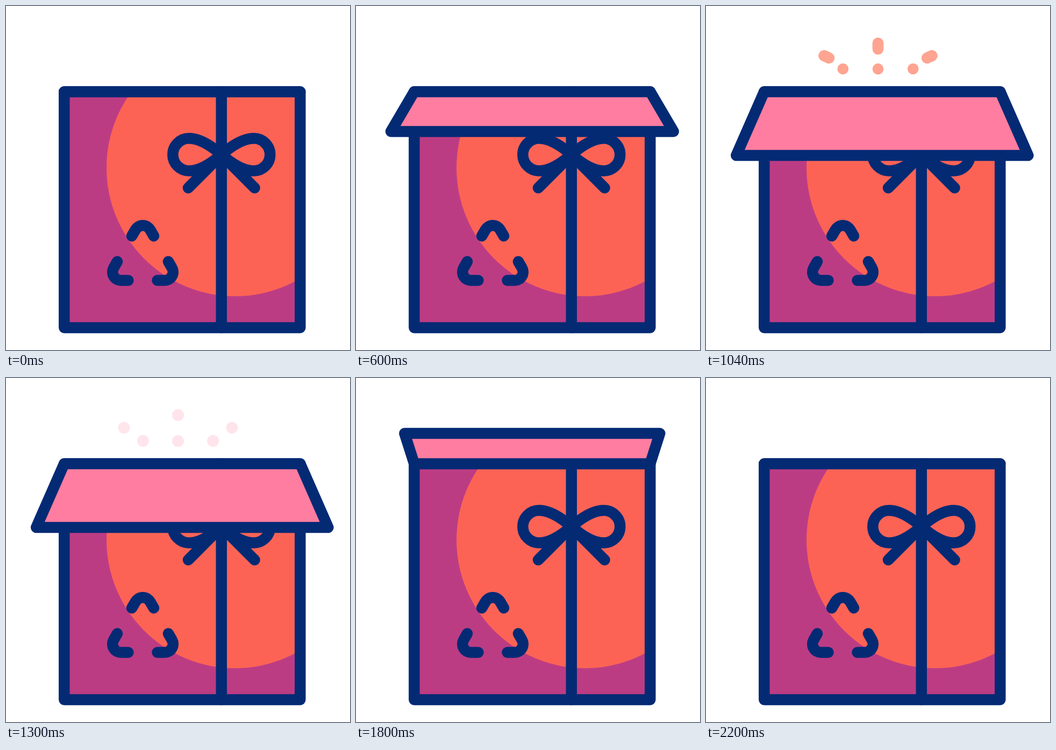
Write an HTML page that moves like this. It is 640 by 640 pixels and loops after 2.4 s.

```html
<!DOCTYPE html>
<html lang="en">
<head>
<meta charset="utf-8">
<title>Gift box</title>
<style>
  html, body { margin: 0; width: 100%; height: 100%; overflow: hidden; background: #fff; }
  svg { display: block; width: 100%; height: 100%; }
  .line { fill: none; stroke: #042a74; stroke-width: 20.5; stroke-linecap: round; stroke-linejoin: round; }
</style>
</head>
<body>
<svg viewBox="0 0 640 640">
  <defs>
    <clipPath id="front"><rect x="108.3" y="159.4" width="439" height="439"/></clipPath>
    <g id="loop">
      <path d="M400.8 276.5C384 262 362 246.3 340.5 246.3A30.2 30.2 0 0 0 340.5 306.7C362 306.7 384 291 400.8 276.5L339 338.5"/>
    </g>
    <g id="corner">
      <path d="M207 475.5L200.3 487.1A15.6 15.6 0 0 0 213.8 510.5H227.5"/>
    </g>
  </defs>

  <g id="sparks" fill="none" stroke-linecap="round">
    <path pathLength="1" d="M254.8 117Q241 101 219.5 92.5"/>
    <path pathLength="1" d="M320 117.2V69"/>
    <path pathLength="1" d="M385.2 117Q399 101 420.5 92.5"/>
  </g>

  <g clip-path="url(#front)">
    <rect x="108" y="159" width="440" height="440" fill="#bc3c84"/>
    <circle cx="426" cy="301" r="239" fill="#fc6355"/>
  </g>
  <g class="line">
    <rect x="108.3" y="159.4" width="439" height="439"/>
    <path d="M400.8 159.4V598.4"/>
    <use href="#loop"/>
    <use href="#loop" transform="matrix(-1 0 0 1 801.6 0)"/>
    <path d="M234 428L241 416A15.6 15.6 0 0 1 268 416L275 428"/>
    <use href="#corner"/>
    <use href="#corner" transform="matrix(-1 0 0 1 509 0)"/>
  </g>
  <path id="flap" class="line" style="fill:#ff7da0"/>
</svg>

<script>
const LOOP = 2400;
const LEFT = 108.3, RIGHT = 547.3, HINGE = 159.4;

// Free edge of the flap: height, and how far it sticks out on each side
const CLOSED = { y: HINGE, out: 0 };
const RAISED = { y: 103, out: 18 };
const OPEN = { y: 278, out: 52.1 };

const YELLOW = [255, 202, 80], PINK = [255, 125, 160];

const flap = document.getElementById('flap');
const sparks = document.getElementById('sparks');

const mix = (a, b, k) => a + (b - a) * k;
const span = (t, from, to) => Math.min(1, Math.max(0, (t - from) / (to - from)));
const smooth = u => u * u * (3 - 2 * u);
const shut = u => u * u * (2.25 - 1.25 * u);

function flapEdge(t) {
  const blend = (a, b, k) => ({ y: mix(a.y, b.y, k), out: mix(a.out, b.out, k) });
  if (t < 400) return blend(CLOSED, RAISED, smooth(span(t, 200, 400)));
  if (t < 1500) return blend(RAISED, OPEN, smooth(span(t, 400, 700)));
  if (t < 1800) return blend(OPEN, RAISED, smooth(span(t, 1500, 1800)));
  return blend(RAISED, CLOSED, shut(span(t, 1800, 2200)));
}

function drawSparks(t) {
  const shown = t > 700 && t < 1510;
  sparks.style.display = shown ? '' : 'none';
  if (!shown) return;
  const head = smooth(span(t, 700, 1000));
  const tail = Math.min(smooth(span(t, 800, 1150)), 0.998);
  const length = Math.max(head - tail, 0.001);
  const tint = span(t, 850, 1150);
  const color = YELLOW.map((c, i) => Math.round(mix(c, PINK[i], tint)));
  sparks.setAttribute('stroke', `rgb(${color})`);
  sparks.setAttribute('stroke-width', mix(20.5, 22, span(t, 1000, 1300)));
  sparks.setAttribute('stroke-dasharray', `0 ${tail} ${length} 2`);
  sparks.setAttribute('opacity', mix(1, 0.2, span(t, 1000, 1300)));
}

function draw(t) {
  const { y, out } = flapEdge(t);
  flap.setAttribute('d', `M${LEFT} ${HINGE}H${RIGHT}L${RIGHT + out} ${y}H${LEFT - out}Z`);
  drawSparks(t);
}

function tick() {
  draw(performance.now() % LOOP);
  requestAnimationFrame(tick);
}
tick();
</script>
</body>
</html>
```
